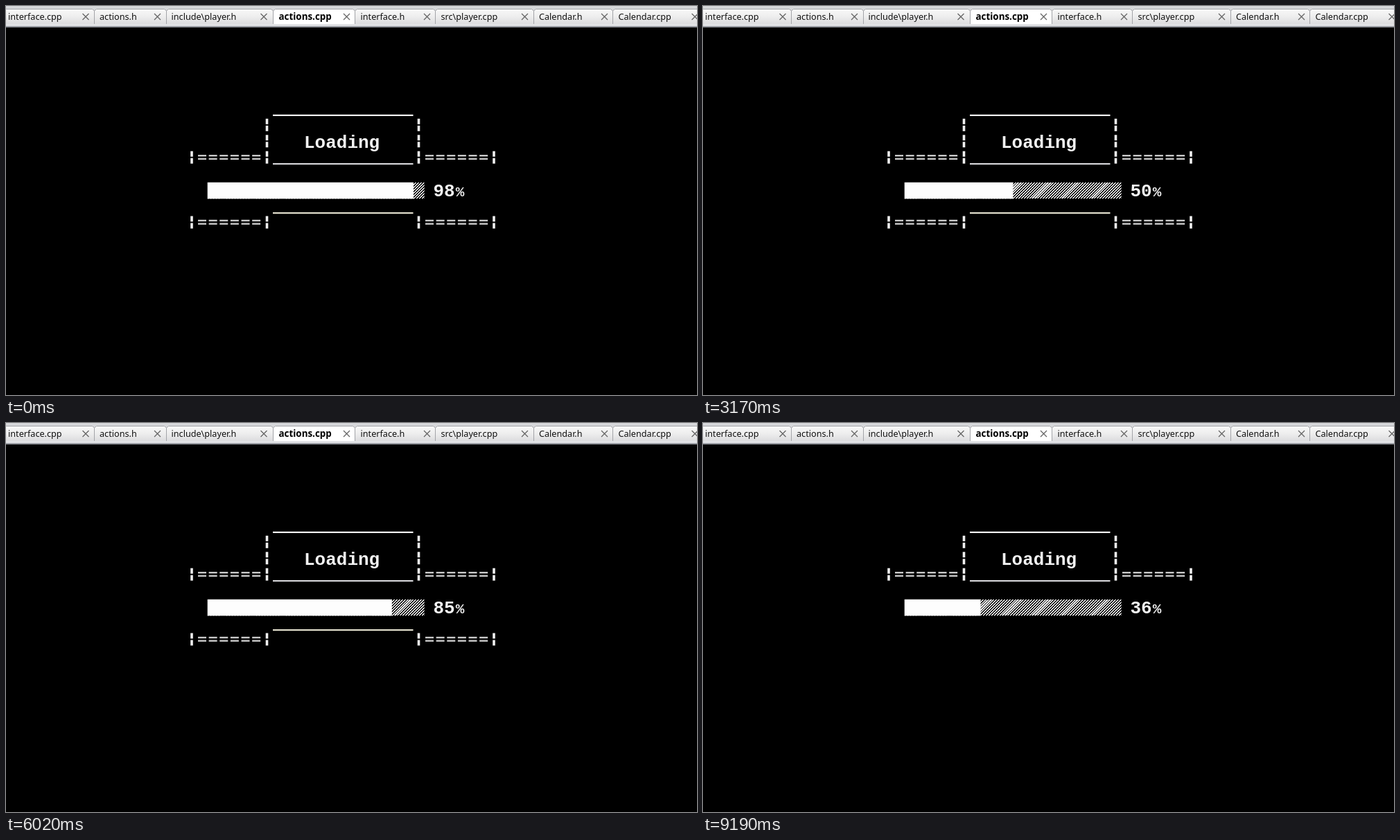
Write an HTML page that moves like this. It is 997 px wide and 562 px high and loops after 9.27 s.

```html
<!DOCTYPE html>
<html lang="en">
<head>
<meta charset="utf-8">
<title>Console loading bar</title>
<style>
  html, body { margin: 0; width: 100%; height: 100%; overflow: hidden; background: #000; }
  svg { display: block; width: 997px; height: 562px; }
  .tab { font: 12.65px "Noto Sans", "Open Sans", sans-serif; fill: #111; }
  .tab.on { font-size: 13.4px; font-weight: 700; fill: #000; }
  .con { font: bold 26px "Liberation Mono", monospace; fill: #f2f2f2; white-space: pre; }
  .small { font-size: 21px; }
</style>
</head>
<body>
<svg id="stage" viewBox="0 0 997 562">
  <defs>
    <linearGradient id="idle" x2="0" y2="1">
      <stop offset="0" stop-color="#f8f8f8"/>
      <stop offset=".5" stop-color="#eeeeee"/>
      <stop offset="1" stop-color="#dcdcde"/>
    </linearGradient>
    <clipPath id="slot"><rect x="291" y="255" width="312.6" height="23.4"/></clipPath>
  </defs>
  <rect width="997" height="562"/>
  <g id="tabs"></g>
  <g id="head"></g>
  <g id="foot"></g>
  <g id="done"></g>
  <g id="hatch" clip-path="url(#slot)"></g>
  <rect id="fill" x="290.7" y="254.8" height="23.7" fill="#fdfdfd"/>
  <text class="con" x="616.5" y="275"><tspan id="pct"></tspan><tspan class="small" dx="1">%</tspan></text>
  <text id="press" class="con" x="258.5" y="463">Press any key to continue . . .</text>
</svg>
<script>
const $ = id => document.getElementById(id);
const NS = "http://www.w3.org/2000/svg";
const LOOP = 9270, CYCLE = 7130, CELL = 15.63, ROW = 23.45;

function add(parent, tag, attrs, text) {
  const el = document.createElementNS(NS, tag);
  for (const k in attrs) el.setAttribute(k, attrs[k]);
  if (text) el.textContent = text;
  parent.appendChild(el);
}
const box = (g, x, y, width, height, fill) => add(g, "rect", { x, y, width, height, fill });
const label = (g, x, y, s) => add(g, "text", { x, y, class: "con" }, s);

// Editor tabs: left edge, text start, close button centre, title
const TABS = [
  [-3, 3, 115, "interface.cpp"],
  [127, 135, 218.5, "actions.h"],
  [231, 238.5, 372, "include\\player.h"],
  [385, 393.5, 491.5, "actions.cpp"],
  [503, 511.5, 607.5, "interface.h"],
  [619, 627.5, 748.5, "src\\player.cpp"],
  [761, 769, 863.5, "Calendar.h"],
  [875, 883.5, 994, "Calendar.cpp"]
];

function drawTabs() {
  const g = $("tabs");
  box(g, 0, 0, 997, 31, "#d6d7da");
  TABS.forEach(([x, tx, cx, name], i) => {
    const on = i === 3;
    const end = i < 7 ? TABS[i + 1][0] : 1010;
    add(g, "path", {
      d: `M${x + .5} 26V7L${x + 3.5} 4.5H${end - 2.5}L${end + .5} 7V26`,
      fill: on ? "#fff" : "url(#idle)", stroke: "#a3a4a8"
    });
    add(g, "text", { x: tx, y: 20, class: on ? "tab on" : "tab" }, name);
    add(g, "path", {
      d: `M${cx - 4.5} 11l9 9m0 -9l-9 9`, stroke: "#666", "stroke-width": 1.3, fill: "none"
    });
  });
  box(g, 0, 26, 997, 3, "#e3e4e7");
  box(g, 0, 29, 997, 2, "#93969d");
}

// Broken vertical bars stacked over n rows
function bars(g, x, y, n) {
  for (let i = 0; i < n; i++) {
    box(g, x - 1.8, y + i * ROW, 3.6, 8, "#f0f0f0");
    box(g, x - 1.8, y + i * ROW + 10, 3.6, 8, "#f0f0f0");
  }
}

function rails(g, y) {
  for (const x of [268, 376.5, 595.5, 704]) bars(g, x, y, 1);
  for (const x of [277, 605])
    for (let i = 0; i < 6; i++) {
      box(g, x + i * CELL, y + 5.3, 12, 2.4, "#c9c9c9");
      box(g, x + i * CELL, y + 10, 12, 2.4, "#c9c9c9");
    }
}

const rule = (g, y, color) => box(g, 385, y, 202.5, 2.2, color);
const sides = (g, y) => [376.5, 595.5].forEach(x => bars(g, x, y, 2));

function drawConsole() {
  const head = $("head"), foot = $("foot"), done = $("done");
  rule(head, 156.8, "#f4f4f4");
  sides(head, 162.8);
  label(head, 430, 205, "Loading");
  rails(head, 209.7);
  rule(head, 227, "#d4d4d8");

  rule(foot, 298, "#e2dfcd");
  rails(foot, 303.5);

  sides(done, 327);
  label(done, 446, 346, "Done!");
  rule(done, 368.4, "#f4f4f4");
}

// Four diagonal strokes per character cell
function drawHatch() {
  let d = "";
  for (let x = 291 - ROW; x < 604; x += CELL / 4) d += `M${x} 278.4l${ROW} ${-ROW}`;
  add($("hatch"), "path", {
    d, stroke: "#f0f0f0", "stroke-width": 1.5, "shape-rendering": "crispEdges"
  });
}

// Time in ms and percent; the counter steps evenly between entries
const STEPS = [
  [0, 98], [160, 100], [1980, 100], [1980, 35], [2060, 36], [3170, 50],
  [3880, 59], [4040, 60], [4750, 70], [5780, 83], [5940, 84], [6020, 85],
  [6890, 96], [7050, 97], [7130, 98]
];

function percent(t) {
  const i = STEPS.findIndex(s => s[0] > t);
  const [t0, p0] = STEPS[i - 1], [t1, p1] = STEPS[i];
  return Math.floor(p0 + (p1 - p0) * (t - t0) / (t1 - t0) + .03);
}

const show = (id, on) => $(id).setAttribute("visibility", on ? "visible" : "hidden");

function frame(now) {
  const t = Math.max(0, now - start) % LOOP % CYCLE;
  const p = percent(t);
  $("fill").setAttribute("width", Math.floor(p / 5) * CELL + .4);
  $("pct").textContent = p;
  show("done", t >= 240 && t < 1980);
  show("press", t >= 1110 && t < 1980);
  show("foot", t < 1980 || t >= 2140);
  requestAnimationFrame(frame);
}

drawTabs();
drawConsole();
drawHatch();
const start = performance.now();
frame(start);
</script>
</body>
</html>
```
